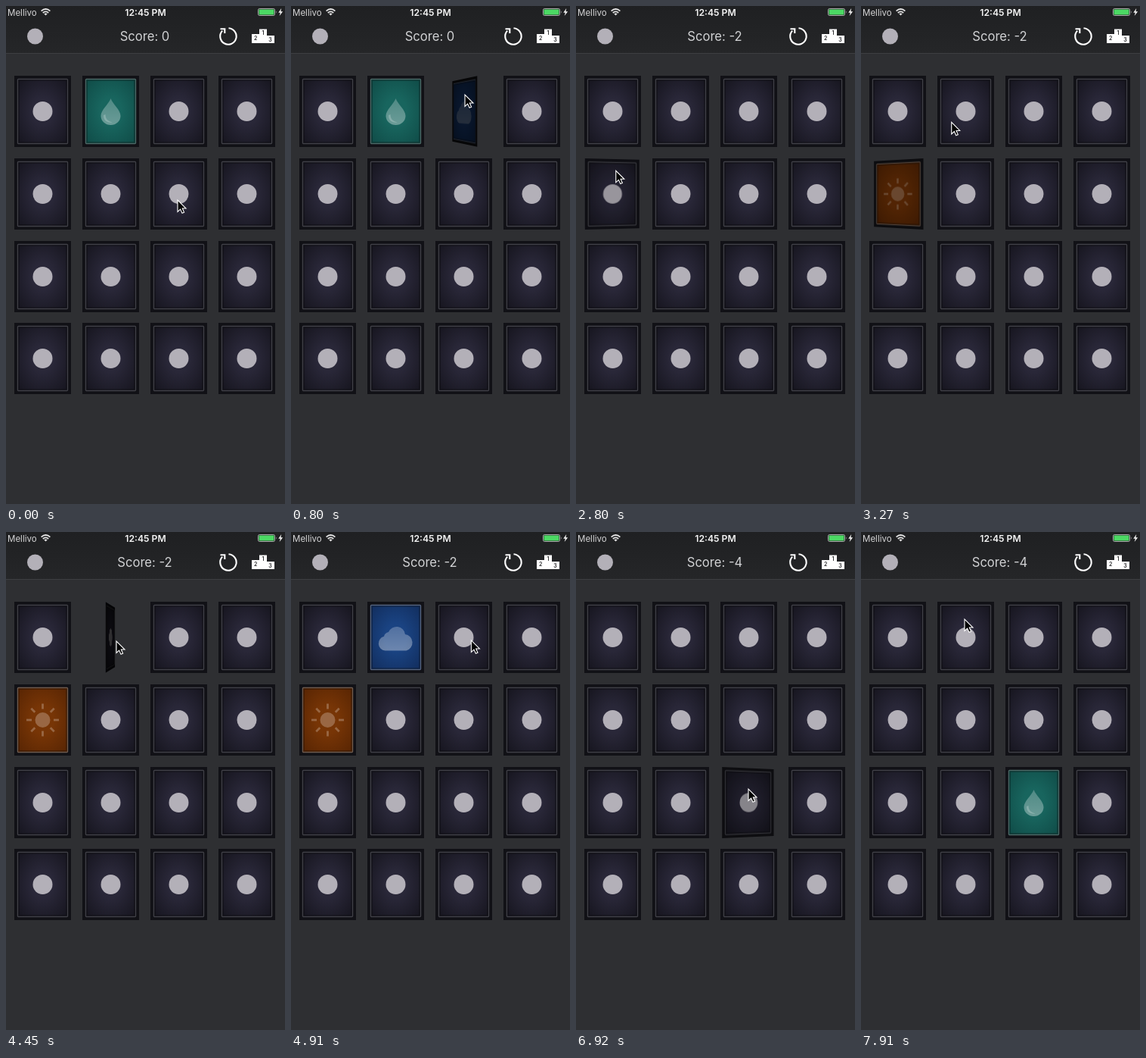
Recreate the animation shown at these times as an HTML page. Size 369 by 657 pixels, loop 8 s.

```html
<!DOCTYPE html>
<html lang="en">
<head>
<meta charset="utf-8">
<title>Card matching game</title>
<style>
  html, body { margin: 0; width: 100%; height: 100%; overflow: hidden; background: #2e2f32; }
  #stage { position: relative; width: 369px; height: 657px; overflow: hidden; background: #2e2f32; }
  svg { display: block; }
  #chrome, #pointer { position: absolute; left: 0; top: 0; }
  .card { position: absolute; width: 75px; height: 94px; }
  text { font-family: Inter, "Liberation Sans", sans-serif; }
</style>
</head>
<body>
<div id="stage">
  <svg id="chrome" width="369" height="657">
    <defs>
      <linearGradient id="bar" x1="0" y1="0" x2="0" y2="1">
        <stop offset="0" stop-color="#1f2022"/><stop offset="1" stop-color="#252628"/>
      </linearGradient>
      <linearGradient id="icon" x1="0" y1="0" x2="0" y2="1">
        <stop offset="0" stop-color="#fff" stop-opacity=".24"/><stop offset="1" stop-color="#fff" stop-opacity=".36"/>
      </linearGradient>
    </defs>
    <rect width="369" height="62" fill="url(#bar)"/>
    <rect y="62" width="369" height="1" fill="#3d3e41"/>

    <text x="2" y="12.5" font-size="11.5" fill="#d4d4d5">Mellivo</text>
    <g fill="none" stroke="#e4e4e4" stroke-width="1.8">
      <path d="M46.6 6.6Q52.5 1.4 58.4 6.6M48.8 9Q52.5 5.8 56.2 9"/>
      <path d="M50.3 10.2Q52.5 8.6 54.7 10.2L52.5 12.4Z" fill="#e4e4e4" stroke="none"/>
    </g>
    <text x="184.5" y="12.7" font-size="12.2" font-weight="600" fill="#f4f4f4" text-anchor="middle">12:45 PM</text>
    <rect x="333.5" y="3.5" width="22" height="9" rx="1.8" fill="none" stroke="#a9abaa"/>
    <rect x="334.5" y="4.5" width="20" height="7" rx=".8" fill="#4cd964"/>
    <path d="M357 6.2q1.6 1.8 0 3.6z" fill="#a9abaa"/>
    <path d="M364.2 3L360.3 8.7h2.5L361.7 13l4.4-5.8h-2.7z" fill="#f4f4f4"/>

    <circle cx="38.5" cy="40" r="10.5" fill="#b3b0b8"/>
    <text id="score" x="183.5" y="45.7" font-size="16.6" fill="#d2d3d5" text-anchor="middle">Score: 0</text>
    <g fill="none" stroke="#fff" stroke-width="2.1">
      <path d="M294.5 29.3A10.7 10.7 0 1 1 286.2 32.6"/>
      <path d="M283.5 30.2H289.3V36"/>
    </g>
    <path d="M325 49V37H335V30.5H345V39H355V49Z" fill="#fff"/>
    <g font-size="7" font-weight="600" fill="#242527" text-anchor="middle">
      <text x="340" y="38.3">1</text><text x="330.2" y="44.5">2</text><text x="349.5" y="46.5">3</text>
    </g>
  </svg>
  <div id="cards"></div>
  <svg id="pointer" width="369" height="657">
    <path id="arrow" d="M0 0V15.5L3.6 12.1L6 17.3L8.6 16.2L6.3 11H11Z" fill="#000" stroke="#fff" stroke-width="1.1"/>
  </svg>
</div>
<script>
const LOOP = 8000, FLIP = 790;

// Symbols are drawn around the card centre.
const rays = Array.from({ length: 8 }, (_, i) =>
  `<path d="M0 -14.5V-21.5" transform="rotate(${i * 45})" stroke="#fff" stroke-opacity=".25" stroke-width="2.8"/>`).join('');
const kinds = {
  back: { inner: '#292738', outer: '#15141d', line: '#404047', art: '<circle r="13" fill="#b3b0b8"/>' },
  drop: { inner: '#18655e', outer: '#0f4a46', line: '#4d6866',
    art: `<path d="M0 -17C3 -9 13 -2 13 6A13 12 0 0 1 -13 6C-13 -2 -3 -9 0 -17Z" fill="url(#icon)"/>
      <path d="M-9.5 5C-10 12 -4 15.5 2 14.5C-4 13 -7 10 -7 4Z" fill="#fff" fill-opacity=".22"/>` },
  cloud: { inner: '#1a4382', outer: '#112c5b', line: '#56647e',
    art: '<path d="M-14 17.5A9.5 9.5 0 0 1 -15.5 -1.2A7.5 7.5 0 0 1 -9.5 -7A11.5 11.5 0 0 1 12.5 -4A11 11 0 0 1 14 17.5Z" fill="url(#icon)"/>' },
  sun: { inner: '#773506', outer: '#562403', line: '#6f5c50',
    art: `<circle r="10" fill="#fff" fill-opacity=".25"/>${rays}` }
};

function cardSvg(kind) {
  const { inner, outer, line, art } = kinds[kind];
  return `<svg width="75" height="94">
    <defs><radialGradient id="fill-${kind}" r=".72">
      <stop offset=".3" stop-color="${inner}"/><stop offset="1" stop-color="${outer}"/>
    </radialGradient></defs>
    <rect width="75" height="94" fill="#111116"/>
    <rect x="4.5" y="4.5" width="66" height="85" rx="1" fill="url(#fill-${kind})" stroke="${line}" stroke-width="1.4"/>
    <rect x="6" y="6" width="63" height="82" fill="none" stroke="#000" stroke-opacity=".25" stroke-width="2"/>
    <g transform="translate(37.5 47)">${art}</g></svg>`;
}

const cards = Array.from({ length: 16 }, (_, i) => {
  const el = document.createElement('div');
  el.className = 'card';
  el.style.left = 11 + 90 * (i % 4) + 'px';
  el.style.top = 92.2 + 108.67 * Math.floor(i / 4) + 'px';
  document.getElementById('cards').append(el);
  return { el, kind: '' };
});

// Each turn: card index, symbol, flip start, time it is hidden again.
const turns = [
  [1, 'drop', -FLIP, 2060],
  [2, 'cloud', 325, 2060],
  [4, 'sun', 2672, 5870],
  [1, 'cloud', 4085, 5870],
  [10, 'drop', 6752, LOOP]
];

// Each move: start, end, x, y.
const moves = [
  [0, 0, 227, 256],
  [20, 200, 230, 117],
  [1190, 1700, 54.5, 205],
  [2030, 2240, 52, 218],
  [2760, 3400, 127, 146.5],
  [3480, 3680, 138, 243],
  [3680, 3890, 146, 144],
  [4520, 4880, 238, 143],
  [4890, 5120, 256, 142],
  [5240, 5420, 234, 143],
  [6110, 6390, 184.5, 245],
  [6390, 6690, 228, 339],
  [7120, 7400, 278, 282],
  [7400, 7740, 143, 126],
  [7745, 7910, 137, 115]
];

const clamp = v => Math.max(0, Math.min(1, v));
const ease = v => 0.5 - 0.5 * Math.cos(Math.PI * clamp(v));

function pointerAt(t) {
  let [, , x, y] = moves[0];
  for (const [start, end, toX, toY] of moves.slice(1)) {
    if (t < start) break;
    const p = ease((t - start) / (end - start));
    x += (toX - x) * p;
    y += (toY - y) * p;
  }
  return [x, y];
}

function showCard(card, kind, angle) {
  if (card.kind !== kind) {
    card.kind = kind;
    card.el.innerHTML = cardSvg(kind);
  }
  const tilt = Math.sin(angle * Math.PI / 180);
  const flat = tilt < 0.001;
  const turn = angle > 90 ? angle - 180 : angle;
  card.el.style.transform = flat ? 'none'
    : `perspective(375px) translateZ(${-39 * tilt}px) rotateY(${turn}deg)`;
  card.el.style.filter = flat ? 'none' : `brightness(${1 - 0.75 * tilt})`;
}

function render(t) {
  cards.forEach((card, i) => {
    const turn = turns.find(([index, , start, end]) => index === i && t >= start && t < end);
    const angle = turn ? 180 * ease((t - turn[2]) / FLIP) : 0;
    showCard(card, angle > 90 ? turn[1] : 'back', angle);
  });
  const score = t < 2060 ? 0 : t < 5870 ? -2 : -4;
  document.getElementById('score').textContent = `Score: ${score}`;
  document.getElementById('arrow').setAttribute('transform', `translate(${pointerAt(t)})`);
}

const began = performance.now();
function tick() {
  render((performance.now() - began) % LOOP);
  requestAnimationFrame(tick);
}
tick();
</script>
</body>
</html>
```
